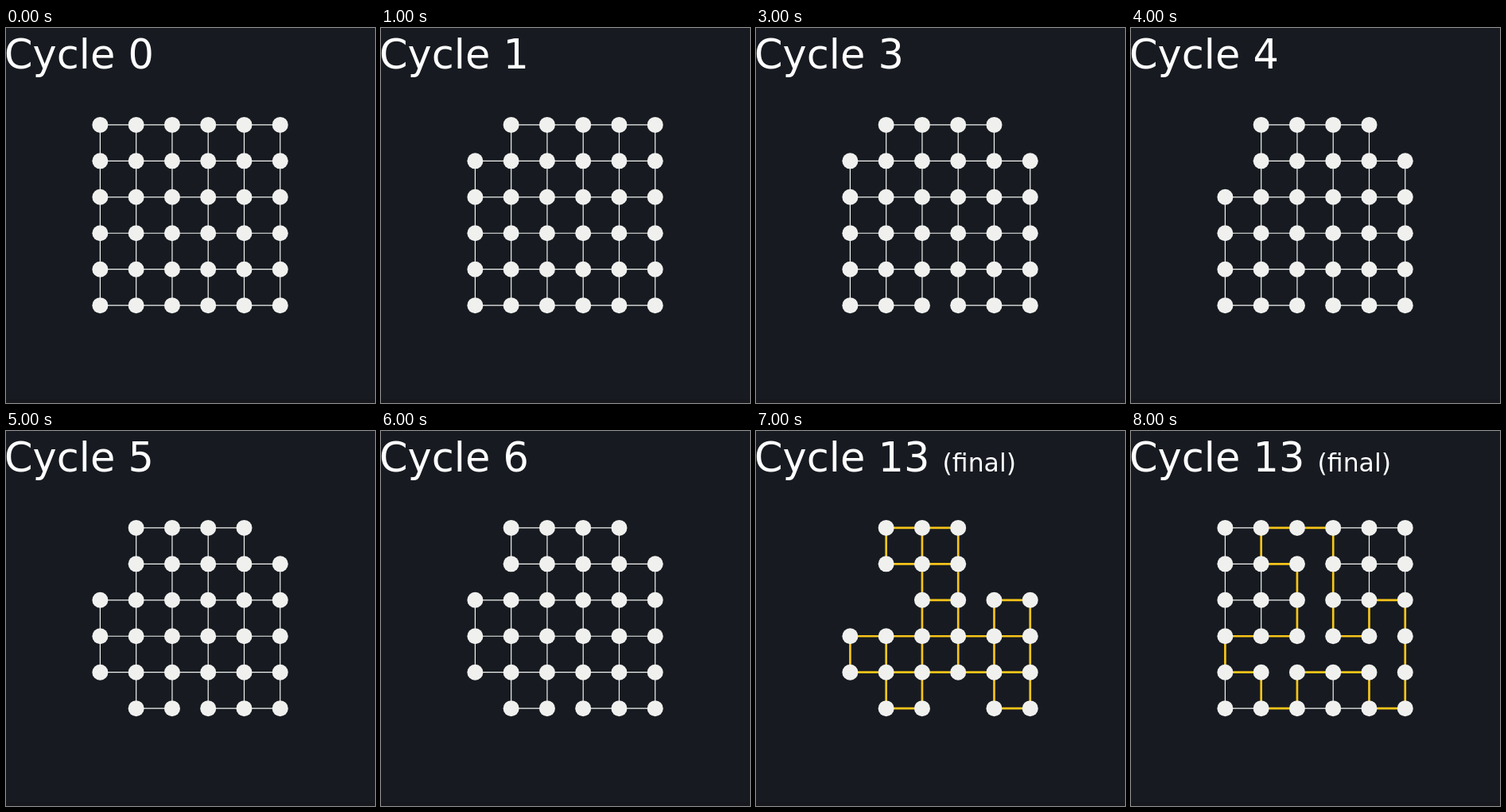
An HTML page with a canvas that plays this animation: 464 px wide and 472 px high, repeating every 9000 ms.

```html
<!DOCTYPE html>
<html>
<head>
<meta charset="utf-8">
<style>
html, body { margin: 0; width: 100%; height: 100%; overflow: hidden; background: #171b21; }
canvas { display: block; }
</style>
</head>
<body>
<canvas id="stage" width="464" height="472"></canvas>
<script>
const ctx = document.getElementById('stage').getContext('2d');
const FONT = 'Verdana, "DejaVu Sans", sans-serif';
const WHITE = '#f3f4f1', YELLOW = '#f7c519', NODE = '#f0f1ee';
const STEP = 1000, STEPS = 9, SIZE = 5;

// Cells taken away one per cycle, as column + row
const removed = ['00', '24', '40', '01', '04', '11'];
// Cells left after the last cycle
const finalRows = ['.##..', '..#..', '..#.#', '#####', '.#..#'];

const px = c => 118.4 + 45.27 * c;
const py = r => 121.9 + 45.45 * r;

function line(c1, r1, c2, r2, color, width) {
  ctx.strokeStyle = color;
  ctx.lineWidth = width;
  ctx.beginPath();
  ctx.moveTo(px(c1), py(r1));
  ctx.lineTo(px(c2), py(r2));
  ctx.stroke();
}

function node(c, r) {
  ctx.fillStyle = NODE;
  ctx.beginPath();
  ctx.arc(px(c), py(r), 10, 0, 7);
  ctx.fill();
}

function text(str, x, y, size) {
  ctx.fillStyle = '#fff';
  ctx.font = size + 'px ' + FONT;
  ctx.fillText(str, x, y);
}

function drawGrid(step) {
  const gone = removed.slice(0, step);
  const has = (c, r) => {
    if (c < 0 || r < 0 || c >= SIZE || r >= SIZE) return 0;
    return step < 7 ? +!gone.includes('' + c + r) : +(finalRows[r][c] === '#');
  };
  const outline = step === 8;

  // In the outline step, edges inside the region vanish and its border lights up
  function edge(c1, r1, c2, r2, sides) {
    if (outline) {
      if (sides === 0) line(c1, r1, c2, r2, WHITE, 1.2);
      if (sides === 1) line(c1, r1, c2, r2, YELLOW, 2.7);
    } else if (sides) {
      line(c1, r1, c2, r2, step === 7 ? YELLOW : WHITE, step === 7 ? 2.7 : 1.2);
    }
  }

  for (let r = 0; r <= SIZE; r++)
    for (let c = 0; c <= SIZE; c++) {
      if (c < SIZE) edge(c, r, c + 1, r, has(c, r) + has(c, r - 1));
      if (r < SIZE) edge(c, r, c, r + 1, has(c, r) + has(c - 1, r));
    }
  for (let r = 0; r <= SIZE; r++)
    for (let c = 0; c <= SIZE; c++)
      if (outline || has(c, r) + has(c - 1, r) + has(c, r - 1) + has(c - 1, r - 1)) node(c, r);
}

function frame() {
  const step = Math.floor(performance.now() / STEP) % STEPS;
  ctx.fillStyle = '#171b21';
  ctx.fillRect(0, 0, 464, 472);
  ctx.fillStyle = '#17171e';
  ctx.fillRect(0, 467, 464, 5);
  text('Cycle ' + (step < 7 ? step : 13), -2, 51, 51);
  if (step >= 7) text('(final)', 234.5, 50.5, 31.5);
  drawGrid(step);
  requestAnimationFrame(frame);
}
frame();
</script>
</body>
</html>
```
